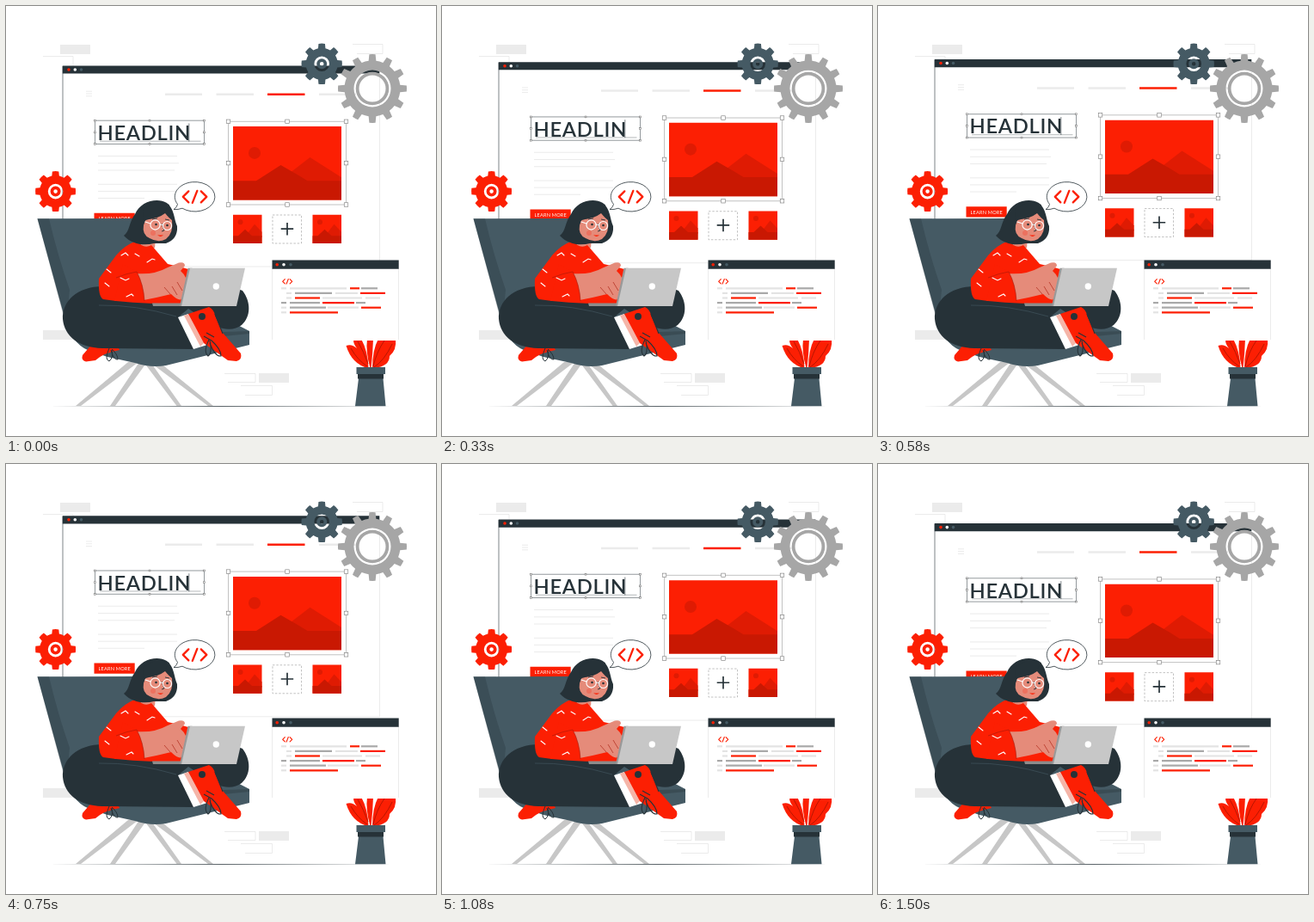
These frames come from a looping animation (500 px wide and 500 px high, 1540 ms). An HTML page:

```html
<!DOCTYPE html>
<html lang="en">
<head>
<meta charset="utf-8">
<title>Web design illustration</title>
<style>
  html, body { margin: 0; height: 100%; overflow: hidden; background: #fff; }
  svg { display: block; width: 100vw; height: 100vh; }
  text { font-family: Lato, sans-serif; }
  .red { fill: #fc1f03; } .shade { fill: #c91802; } .mid { fill: #df1b03; }
  .dark { fill: #263238; } .slate { fill: #455a64; } .pale { fill: #ebebeb; }
  .white { fill: #fff; } .skin { fill: #e58b7a; } .silver { fill: #c7c7c7; }
  .line { fill: none; stroke: #263238; stroke-width: .6; }
  .faint { fill: none; stroke: #e3e3e3; stroke-width: .7; }
  .vein { fill: none; stroke: #b01502; stroke-width: .9; }
  .tick { fill: none; stroke: #fff; stroke-width: 1.1; stroke-linecap: round; }
  .tag { fill: none; stroke: #fc1f03; stroke-linejoin: round; stroke-linecap: round; }
</style>
</head>
<body>
<svg viewBox="0 0 500 500">
  <defs>
    <g id="thumb">
      <path class="red" d="M0 0h33.500v33.300H0z"/>
      <circle class="mid" cx="8.500" cy="8.500" r="3"/>
      <path class="mid" d="M15 24L25 11l8.500 9v6H15z"/>
      <path class="shade" d="M0 24.500h6L14 17l8 7.500h11.500v8.800H0z"/>
    </g>
    <path id="tag" d="M7 0L.5 6.500L7 13M17 -.5L11.500 13.500M21.500 0L28 6.500L21.500 13"/>
  </defs>

  <path class="pale" d="M63 45h35v11H63zM43 377h35v11H43zM294 427h35v11h-35z"/>
  <path class="faint" d="M43 58.500h35v12M403 44.500h35v11h-30M254 427.500h36v10h-32M273 441.500h36.500v11H278"/>
  <path class="dark" d="M50 465.300L250 464.900L450 465.300L250 465.800z"/>

  <g id="page">
    <path class="white" d="M66 69.500h368.500v233H66z"/>
    <path class="faint" d="M434.500 78v225H66"/>
    <path class="line" d="M66 70v233"/>
    <path class="dark" d="M65.800 69.500h368.500v9.100H65.800z"/>
    <circle class="red" cx="73" cy="74" r="1.800"/><circle class="white" cx="80.300" cy="74" r="1.800"/><circle class="slate" cx="87.500" cy="74" r="1.800"/>
    <path class="faint" d="M93 99.200h7M93 102h7M93 104.800h7"/>
    <path class="pale" d="M185 101.600h43v2.500h-43zM244.500 101.600h43.500v2.500h-43.500zM364 101.600h43v2.500h-43z"/>
    <path class="red" d="M304 101.600h43.500v2.500H304z"/>

    <path class="line" d="M103.500 133.200h127v27.300h-127z" style="stroke-width:.5"/>
    <g id="smallHandles"></g>
    <text class="dark" x="106.500" y="155.900" font-size="23.800" font-weight="600" letter-spacing=".65">HEADLIN</text>
    <path class="line" d="M212.800 136.500v21"/>
    <path class="line" d="M109 157.200h117.500" style="stroke-width:.35"/>
    <path class="faint" d="M107 174.500h92M107 182.800h94M107 191h89M107 207.300h92M107 215.400h92M107 223.500h54"/>
    <path class="red" d="M102.500 240.800h47.200V253h-47.200z"/>
    <text class="white" x="107.500" y="249.200" font-size="5.600" letter-spacing=".2">LEARN MORE</text>

    <path class="line" d="M258.500 134.300h137v96.700h-137z" style="stroke:#999"/>
    <g id="bigHandles"></g>
    <path class="red" d="M264 140.100h126v85.400H264z"/>
    <circle class="mid" cx="289" cy="170.900" r="7"/>
    <path class="mid" d="M318 203.500l18-14 17.500-13.600 36.500 23.300v5z"/>
    <path class="shade" d="M264 203.300h27l28.500-18.300 20 11.500 11 6.800H390V225.500H264z"/>
    <use href="#thumb" x="264" y="242.700"/><use href="#thumb" x="356.500" y="242.700"/>
    <path class="line" d="M310 243h33.500v33H310z" stroke-dasharray="2.500 1.800" style="stroke:#999"/>
    <path class="line" d="M327 252v14.500M319.700 259.200h14.500" style="stroke-width:1.700"/>
  </g>

  <g id="gears" fill-rule="evenodd"></g>

  <!-- plant -->
  <path class="red" d="M420.500 421Q402 416 395.500 395Q402 392.500 408 398Q403 392 404.500 387H413Q421 402 421.500 421zM423.500 421Q418 402 420 387H427Q426.500 404 424.500 421zM426 421Q426 400 433 387H453Q454.500 400 446 407Q446 419 428 421z"/>
  <path class="vein" d="M420 419Q409 412 401 398M421 416Q416 402 409 390M427 419Q431 402 440 389M428 420Q440 412 449 393"/>
  <path class="slate" d="M407.500 420h33.500v8h-33.500zM410 433h28.500l3 32.300h-35.500z"/>
  <path class="dark" d="M409 428h30v5.500h-30z"/>

  <!-- code window -->
  <path class="white" d="M309.500 296h147v93h-147z"/>
  <path class="faint" d="M309.600 305v83M456.500 305v83"/>
  <path class="dark" d="M309.500 295.600h147.200v10.200H309.500z"/>
  <circle class="red" cx="315.200" cy="300.700" r="1.800"/><circle class="white" cx="323" cy="300.700" r="1.800"/><circle class="slate" cx="331" cy="300.700" r="1.800"/>
  <use class="tag" href="#tag" transform="translate(321.500 317.700)scale(.4)" stroke-width="2.800"/>
  <g id="code" stroke-width="2.200"></g>

  <!-- chair -->
  <path class="silver" d="M142 414h12L87 465h-6zM155 414h9l-37 51h-6zM160 414h8l36 51h-5.500zM167 414h11l63 51h-6z"/>
  <path class="slate" d="M36.500 247.300L152 247L190 330L283 378v16L186 418Q168 421 150 415L118 408L95 400Q76 392 68 362z"/>
  <path class="dark" d="M36.500 247.300h13.500Q60 290 74 330L70 372z" opacity=".3"/>
  <path class="dark" d="M225 380l58-2v3l-60 6z" opacity=".35"/>

  <!-- shoes and trousers -->
  <path class="red" d="M101 392L89 406Q87 412 93 413.500L104 412Q114 403 132 400L128 392z"/>
  <path class="line" d="M120 398q-6 13 0 15q5-4 3-13M123 399q7 6 7 12q-5 1-8-11" style="stroke-width:1"/>
  <path class="dark" d="M113 326C82 326 65 344 66 364C68 384 84 397 112 398L219 399L200 362L212 352L243 372Q262 380 274 371C285 361 285 344 275 331L262 326z"/>
  <path class="line" d="M108 348Q150 347 198 361" style="stroke:#455a64"/>
  <path class="white" d="M200 362l12-4 22 36-16 5z"/>
  <path fill="#f5b5a8" d="M207 360l5-2 18 34-4 4z"/>
  <path class="red" d="M212 358L236 350Q242 353 243 360L252 380L273 404Q275 411 268 413L258 412L230 392z"/>
  <circle class="dark" cx="228" cy="361" r="4"/>
  <path class="line" d="M243 358l9 23M230 384l9 5M233 380l9 5M236 388q-7 14-1 19q5-3 2-18M239 389q11 10 11 18q-7 1-13-15" style="stroke-width:1.100"/>

  <!-- sweater and arm -->
  <path class="skin" d="M154 270L160 288L173 281L174 272z"/>
  <path class="red" d="M152 273Q138 278 128 290L108 317Q107 338 113 341Q150 347 203 346L212 306L205 304L188 300L169 278Q160 283 152 273z"/>
  <path class="skin" d="M151 311Q172 313 188 304L201 298.500Q208 297 208 302L203 308Q211 315 210.500 325L207.500 329Q207 338 203 341.500Q199 342 192 335Q176 339 160 342z"/>
  <path class="red" d="M136 300L152 309Q160 324 161 343L126 343z"/>
  <path class="line" d="M152 309Q160 324 161 343M128 316Q140 311 152 309M191 335l-7-8M199 336l-6-10M205 331l-6-10" style="stroke:#a5180b"/>
  <path class="tick" d="M117 306l5 4M134 290l5-3 3 3M115 322l5 4M133 316l6 3 4-2M140 338l6-3 2 2M150 288l5 3M164 298l6-4 3 1"/>

  <!-- head -->
  <path class="dark" d="M150 242C156 227 176 222 187 229C196 236 195 247 199 256Q200 271 186 276L172 276C160 279 146 277 137 267C144 262 143 251 150 242z"/>
  <path class="skin" d="M163 248Q176 248 185 241Q190 247 193 249Q195 264 186 271Q177 276 167 270Q158 266 160 255Q161 251 163 248z"/>
  <path class="dark" d="M159 250Q173 247 185 239L190 231L176 227L160 236z"/>
  <circle fill="#f0604d" cx="171" cy="264" r="3" opacity=".6"/>
  <path class="line" d="M170 248l6-1M185 248l5 1M181 253l3 8-3 1" style="stroke-width:.9"/>
  <circle class="dark" cx="174.500" cy="254" r="1.300"/><circle class="dark" cx="187.500" cy="255" r="1.300"/>
  <path class="red" d="M176 266q4 1 7 0q-3 4-7 0z"/>
  <g class="tick"><circle cx="173.500" cy="254.500" r="5.600"/><circle cx="187.500" cy="255.500" r="5"/><path d="M179 254l3.500 .5M168 253l-6-2"/></g>

  <!-- laptop -->
  <path fill="#8c8c8c" d="M170 345.500h36v3.500h-35z"/>
  <path fill="#999" d="M211.500 304.800h5L207 349h-5z"/>
  <path class="silver" d="M214 304.800h64L268 349h-64z"/>
  <circle class="white" cx="244.300" cy="326" r="3.700"/>

  <!-- speech bubble -->
  <path class="white" d="M199.500 230.500Q199 234 195 236.500Q200 237 205 235.200A23.300 17.200 0 1 0 199.500 230.500Z" stroke="#263238" stroke-width=".8"/>
  <use class="tag" href="#tag" x="205.300" y="215.400" stroke-width="2.300"/>
</svg>

<script>
const $ = id => document.getElementById(id);

function gear(cx, cy, body, tip, teeth, baseHalf, tipHalf, rings, color) {
  const at = (r, a) => `${cx + r * Math.sin(a)} ${cy - r * Math.cos(a)}`;
  const arc = (r, a) => `A${r} ${r} 0 0 1 ${at(r, a)}`;
  let d = "M" + at(body, -baseHalf);
  for (let i = 0; i < teeth; i++) {
    const a = i * 2 * Math.PI / teeth;
    d += arc(body, a - baseHalf) + "L" + at(tip, a - tipHalf) +
      arc(tip, a + tipHalf) + "L" + at(body, a + baseHalf);
  }
  d += arc(body, -baseHalf) + "Z";
  for (const r of rings) d += `M${cx - r} ${cy}a${r} ${r} 0 1 0 ${2 * r} 0a${r} ${r} 0 1 0 ${-2 * r} 0Z`;
  return `<path fill="${color}" d="${d}"/>`;
}

$("gears").innerHTML =
  gear(57.6, 215.6, 18.6, 23.5, 8, .23, .16, [8.8, 6, 2.3], "#fc1f03") +
  gear(367.2, 67.3, 18.6, 23.7, 8, .23, .16, [8.8, 6, 2.3], "#455a64") +
  gear(426, 96, 32.5, 40, 12, .135, .09, [21.5, 19.3, 15.5], "#a6a6a6");

function handles(id, x, y, w, h, size) {
  for (const i of [0, .5, 1]) for (const j of [0, .5, 1]) {
    if (i === .5 && j === .5) continue;
    $(id).innerHTML += `<rect x="${x + i * w - size / 2}" y="${y + j * h - size / 2}" width="${size}"
      height="${size}" fill="#fff" stroke="#777" stroke-width=".6"/>`;
  }
}
handles("smallHandles", 103.5, 133.2, 127, 27.3, 1.8);
handles("bigHandles", 258.5, 134.3, 137, 96.7, 4.5);

// Each bar: colour key, start, end (l light, g grey, r red)
const inks = { l: "#e3e3e3", g: "#a9a9a9", r: "#fc1f03" };
[
  "l320-326 l330-396 r400-411 g413-432",
  "l326-332 g336-379 l383-409 r412-441",
  "l326-332 r336-365 l368-414 l418-435",
  "g320-326 g330-365 r368-405 g407-418",
  "l320-326 g330-372 l374-410 r413-436",
  "l320-326 r330-386"
].forEach((row, i) => {
  for (const bar of row.split(" ")) {
    const [from, to] = bar.slice(1).split("-");
    $("code").innerHTML += `<path stroke="${inks[bar[0]]}" d="M${from} ${328.3 + i * 5.6}H${to}"/>`;
  }
});

// The page floats up and down linearly, stepped at 24 per second.
const LOOP = 1540, STEP = 1000 / 24, HALF = 735, RISE = 9.4;
function draw(now) {
  const t = Math.floor((now % LOOP + 5) / STEP) * STEP;
  const lift = RISE * (1 - Math.abs(t % (2 * HALF) / HALF - 1));
  $("page").setAttribute("transform", `translate(0 ${-lift})`);
  requestAnimationFrame(draw);
}
draw(performance.now());
</script>
</body>
</html>
```
